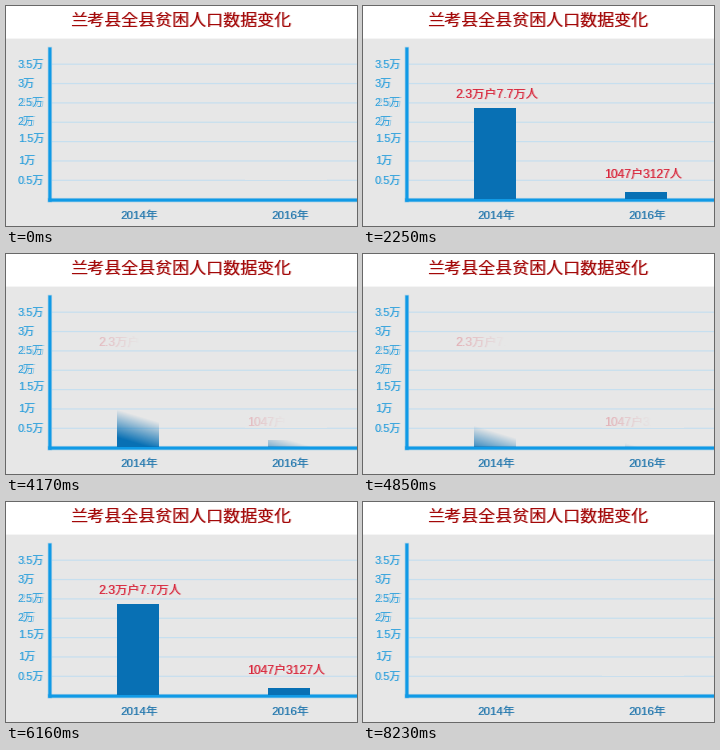
These frames come from a looping animation (351x220 px, 8550 ms). A matplotlib script:

```python
import numpy as np
import matplotlib.pyplot as plt
from matplotlib.animation import FuncAnimation
from matplotlib.colors import to_rgb
from matplotlib.patches import Rectangle

W, H, DPI = 351, 220, 100
LOOP, STEP = 8550, 30
PANEL, AXIS, GRID = "#e7e7e7", "#109ae6", "#c6dfef"
BAR, RED, TICK, YEAR = "#0870b4", "#d9273c", "#2a9fdd", "#2478ae"
TILT, EDGE = 0.3, 28  # slope and soft width (px) of the bar wipe

plt.rcParams["font.family"] = ["Liberation Sans", "Noto Sans CJK JP"]
fig = plt.figure(figsize=(W / DPI, H / DPI), dpi=DPI, facecolor="white")
ax = fig.add_axes([0, 0, 1, 1])
ax.axis("off")


def rect(x0, y0, x1, y1, color, z, alpha=1):
    ax.add_patch(Rectangle((x0, y0), x1 - x0, y1 - y0, fc=color, lw=0,
                           alpha=alpha, zorder=z, snap=False))


def soft_line(x0, y0, x1, y1, color, z):
    rect(x0 - 0.7, y0 - 0.7, x1 + 0.7, y1 + 0.7, color, z, 0.3)
    rect(x0, y0, x1, y1, color, z)


def label(x, y, text, px, color, ha="left", heft=0.5, **kw):
    """Text with a faint second strike to thicken the strokes."""
    for dx, alpha in ((0, 1), (1, heft)):
        ax.text(x + dx, y, text, fontsize=px * 72 / DPI, color=color, ha=ha,
                va="baseline", alpha=alpha, zorder=3, **kw)


def layer(x0, y0, x1, y1, color, z):
    """Flat colour block whose alpha can be changed per pixel."""
    rgba = np.zeros((y1 - y0, x1 - x0, 4))
    rgba[..., :3] = to_rgb(color)
    image = ax.imshow(rgba, extent=(x0, x1, y1, y0), aspect="auto",
                      interpolation="nearest", zorder=z)
    return image, rgba


def soft_wipe(pos, level, soft):
    """Opacity along pos (0..1) for a soft-edged wipe shown up to level."""
    return np.clip((level * (1 + soft) - pos) / soft, 0, 1)


rect(0, 32.6, W, H, PANEL, 0)
label(174.5, 19.5, "兰考县全县贫困人口数据变化", 17, "#a30808", "center",
      heft=0.4, family="Noto Sans CJK JP")

ticks = {"3.5万": 61.5, "3万": 80.5, "2.5万": 99.5, "2万": 118.5,
         "1.5万": 136, "1万": 158, "0.5万": 177.5}
for i, (tick, base) in enumerate(ticks.items()):
    y = 57.6 + 19.35 * i
    rect(46, y, W, y + 1.2, GRID, 1)
    label(12, base, tick, 11, TICK, heft=0.4)

soft_line(42.4, 41.5, 45.4, 195.6, AXIS, 4)
soft_line(42.4, 192.6, W, 195.6, AXIS, 4)
label(133.5, 213.5, "2014年", 11.5, YEAR, "center")
label(284.5, 213.5, "2016年", 11.5, YEAR, "center")

label(92, 91.5, "2.3万户7.7万人", 12.2, RED)
label(241, 171.5, "1047户3127人", 12, RED)

bars = [layer(111, 102, 153, 193, BAR, 5), layer(262, 186, 304, 193, BAR, 5)]
covers = [layer(90, 79, 178, 96, PANEL, 4), layer(239, 159, 321, 174, PANEL, 4)]

ax.set_xlim(0, W)
ax.set_ylim(H, 0)


def levels(t):
    """Visible share of tall bar, short bar and captions at time t (ms)."""
    for start, leave in ((890, 3800), (4780, 7700)):
        if start <= t < leave:
            k = (t - start) // 75 + 1
            return min(1, k / 6.1), min(1, k / 11), min(1, k / 5)
        if leave <= t < leave + 520:
            q = 1 - (t - leave) // 74 / 7
            return q, q, max(0, 1.17 * q - 0.17)
    return 0, 0, 0


def update(i):
    *bar_levels, text_level = levels(i * STEP + 20)
    for (image, rgba), level in zip(bars, bar_levels):
        h, w = rgba.shape[:2]
        reach = h + TILT * w
        up = h - np.arange(h)[:, None] - 0.5
        across = np.arange(w)[None, :] + 0.5
        rgba[..., 3] = soft_wipe((up + TILT * across) / reach, level, EDGE / reach)
        image.set_data(rgba)
    for image, rgba in covers:
        n = rgba.shape[1]
        pos = (np.arange(n) + 0.5) / n
        rgba[..., 3] = 1 - soft_wipe(pos, text_level, 2)
        image.set_data(rgba)
    return [image for image, _ in bars + covers]


anim = FuncAnimation(fig, update, frames=LOOP // STEP, interval=STEP,
                     repeat=True, repeat_delay=0, blit=False)
plt.show()
```
